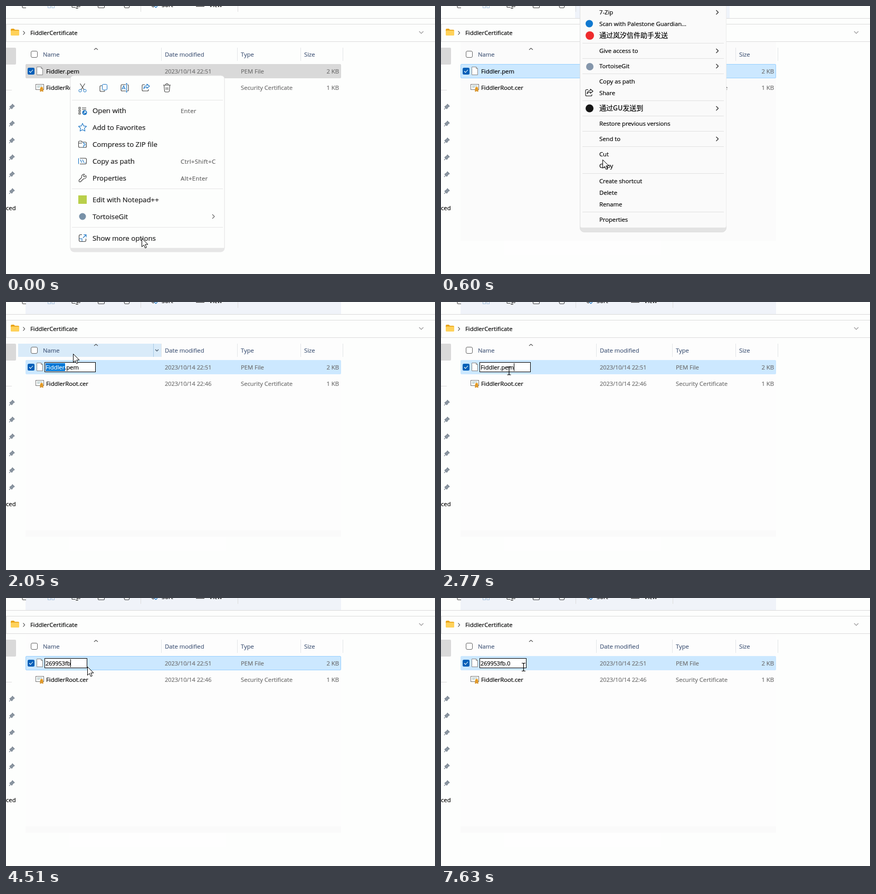
An HTML page that plays this animation: 813 by 508 pixels, repeating every 8 s.

```html
<!DOCTYPE html>
<html lang="en">
<head>
<meta charset="utf-8">
<title>Renaming a file</title>
<style>
html, body { margin: 0; width: 100%; height: 100%; overflow: hidden; background: #fdfefd; }
svg { display: block; }
text { font-family: "Open Sans", "Noto Sans", sans-serif; white-space: pre; }
.cjk { font-family: "Noto Sans CJK SC", "Noto Sans CJK", sans-serif; }
.key { letter-spacing: .35px; }
</style>
</head>
<body>
<svg id="stage" width="813" height="508" viewBox="0 0 813 508"></svg>
<script>
const SMALL = 11.25, BIG = 13.25, BLUE = '#1a74c4', INK = '#444';

// a hairline stroke gives the text the weight of hinted screen type
const text = (x, y, s, fill = '#000', size = SMALL, attrs = '') =>
  `<text x="${x}" y="${y}" fill="${fill}" stroke="${fill}" stroke-width=".2" font-size="${size}" ${attrs}>${s}</text>`;
const rect = (x, y, w, h, fill, attrs = '') =>
  `<rect x="${x}" y="${y}" width="${w}" height="${h}" fill="${fill}" ${attrs}/>`;
const path = (d, stroke = INK, fill = 'none', w = 1.1) =>
  `<path d="${d}" stroke="${stroke}" fill="${fill}" stroke-width="${w}" stroke-linejoin="round"/>`;
const dot = (x, y, r, fill) => `<circle cx="${x}" cy="${y}" r="${r}" fill="${fill}"/>`;
const group = (id, body, attrs = '') => `<g id="${id}" ${attrs}>${body}</g>`;
const at = (x, y, body) => `<g transform="translate(${x} ${y})">${body}</g>`;
const chevron = (x, y, c = INK) => path(`M${x} ${y - 4}l4 4-4 4`, c);
const shareIcon = path('M-2-6H-5q-2 0-2 2V4q0 2 2 2H3q2 0 2-2V3') +
  path('M2-7l5 4-5 4v-2.500q-4 0-6 3.500 .5-6 6-6.500z', BLUE);

function toolbar() {
  return path('M31 0v2q0 1.500 1.500 1.500H38') +
    path('M79.500 0v3.500h5V0M87 0v3.500h4.500V0', '#a9c3dd') +
    path('M125 0v1.500q0 1 1 1h6M136 0v1.500h4V0M132 4.500h5M134.500 0v4') +
    path('M174.500 0v2q0 1.500 1.500 1.500h9q1.500 0 1.500-1.500V0') +
    path('M224 0l.5 2q.3 1.500 1.500 1.500h6q1.200 0 1.500-1.500l.5-2') +
    rect(255, 0, 1, 11, '#ddd') + rect(439, 0, 1, 11, '#ddd') +
    path('M276 0l3 2 2-2', INK) + path('M281 0l3 3 3-3', BLUE) +
    text(295, 2, 'Sort') + path('M360 .5h16', INK, 'none', 1.500) + text(385, 2, 'View') +
    rect(0, 23, 813, 1, '#dadada');
}

function addressBar() {
  return rect(.5, 34.5, 813, 33, '#fdfefd', 'stroke="#dcdcdc"') +
    path('M9 45q0-2 2-2h4l2 2h6q2 0 2 2v3H9z', 'none', '#e8a317') +
    rect(9, 46.500, 16, 9.500, '#ffd25a', 'rx="1.500"') +
    path('M32.500 47.500l3 3.500-3 3.500', '#333') +
    text(46, 55, 'FiddlerCertificate') +
    path('M783 48l4 4 4-4', '#999');
}

function sidebar() {
  let s = rect(-5, 79, 24, 32, '#d9d9d9', 'rx="2"') + rect(0, 159, 11, 1, '#ddd') + text(0, 387, 'ced');
  for (let y = 191; y < 360; y += 32)
    s += at(11, y, path('M1-5l4 4-2 1-3 4-4-4 4-3zM-2 2l-3 3', '#7d8894', '#8b96a2'));
  return s;
}

function header() {
  const c = '#46597a';
  return group('headHover', rect(23, 79, 272, 25, '#d9ebf9') + rect(279, 79, 1, 25, '#a9cbe6') +
      path('M283 90l3 3 3-3', '#456')) +
    rect(47.500, 85.500, 12, 12, '#fff', 'rx="2.500" stroke="#666"') +
    path('M167 83l3.500-3 3.500 3', '#555') +
    text(70, 96, 'Name', c) + text(301, 96, 'Date modified', c) +
    text(445, 96, 'Type', c) + text(565, 96, 'Size', c) +
    [294, 438, 558, 638].map(x => rect(x, 79, 1, 25, '#e3e5e8')).join('');
}

function details(y, date, type, size) {
  const c = '#6d6d6d';
  return text(301, y, date, c, 10.9) + text(445, y, type, c) + text(631, y, size, c, SMALL, 'text-anchor="end"');
}

function fileList() {
  return '<rect id="row" x="37.5" y="110.5" width="597" height="26" rx="1.5"/>' +
    rect(41, 117, 13, 13, '#005fb8', 'rx="2.500"') + path('M44 123.500l2.500 2.500 4.500-5', '#fff') +
    path('M58.500 115.500h8l3 3v12h-11z', '#888', '#fff', 1) + path('M66.500 115.500v3h3', '#888', 'none', 1) +
    text(76, 128, 'Fiddler.pem', '#000', SMALL, 'id="name"') +
    details(128, '2023/10/14 22:51', 'PEM File', '2 KB') +
    rect(56.500, 148.500, 15, 10, '#fff', 'stroke="#777"') +
    path('M59 151.500h10M59 154h5', '#8aa') +
    path('M65 157v5l2.500-1.500 2.500 1.500v-5', '#d18a1b', '#e7a13a') + dot(67.500, 156, 2.700, '#e59a22') +
    text(76, 159, 'FiddlerRoot.cer') +
    details(159, '2023/10/14 22:46', 'Security Certificate', '1 KB');
}

function editBox() {
  return group('edit',
    '<rect id="box" x="73.5" y="114.5" height="18" fill="#fff" stroke="#000"/>' +
    '<rect id="mark" x="75" y="116" height="15" fill="#0078d7"/>' +
    '<text id="typed" x="75" y="128" stroke-width=".2"><tspan id="marked" fill="#fff" stroke="#fff"></tspan>' +
    '<tspan id="plain" stroke="#000"></tspan></text>' +
    '<rect id="caret" y="116" width="1" height="15"/>');
}

function shortMenu() {
  const items = [
    [198, 'Open with', 'Enter'], [230, 'Add to Favorites'], [262, 'Compress to ZIP file'],
    [294, 'Copy as path', 'Ctrl+Shift+C'], [326, 'Properties', 'Alt+Enter'],
    [367, 'Edit with Notepad++'], [399, 'TortoiseGit'], [440, 'Show more options']];
  return group('shortMenu',
    rect(121.500, 131.500, 293, 335, '#e6e6e6', 'rx="8"') +
    path('M122 459V139q0-7 7-7H407q7 0 7 7V459z', '#e4e4e4', '#fdfefd', .8) +
    group('moreHover', rect(126, 425, 284, 31, '#f1f1f1', 'rx="4"')) +
    [178, 346, 419].map(y => rect(125, y, 286, 1, '#e6e6e6')).join('') +
    at(145, 155, path('M-4.500-8L3 4M4.500-8L-3 4') +
      '<g fill="none" stroke="#1a74c4"><circle cx="-4.500" cy="5.500" r="2.500"/><circle cx="4.500" cy="5.500" r="2.500"/></g>') +
    at(185, 155, path('M-3-4h-2q-2 0-2 2v7q0 2 2 2h5q2 0 2-2') + rect(-2.500, -6.500, 9, 10.500, '#fff', 'rx="2" stroke="#1a74c4"')) +
    at(225, 155, path('M2-6h-7q-2 0-2 2V4q0 2 2 2h7M5-6q2 0 2 2V4q0 2-2 2') +
      path('M-5 3l3-7 3 7M-4 1h4M3.500-8v16M2-8h3M2 8h3', BLUE)) +
    at(265, 155, shareIcon) +
    at(305, 155, path('M-7-5H7M-2.500-5q0-3 2.500-3t2.500 3M-5.500-5l1 11q.2 2 2 2h5q1.800 0 2-2l1-11M-1.500-1v5M1.500-1v5')) +
    at(145, 198, path('M-7-6h3v3h-3zM-7-1h3v3h-3zM-7 4h3v3h-3zM-1-5h8M-1-2h8') + dot(4, 4, 4.500, BLUE) + path('M2 6l4-4M3 2h3v3', '#fff')) +
    at(145, 230, path('M0-7.500l2.300 4.900 5.300 .6-4 3.600 1.100 5.400L0 4.400-4.700 7l1.100-5.400-4-3.600 5.300-.6z', BLUE)) +
    at(145, 262, path('M-7.500-4q0-2 2-2h3l2 2h6q2 0 2 2v6q0 2-2 2h-11q-2 0-2-2zM-7-2h6') + path('M2-4v3h3v3H2v4', BLUE)) +
    at(145, 294, path('M-5-5.500H5q2.500 0 2.500 2.500V3q0 2.500-2.500 2.500H-5') + path('M-7.500-5.500v11M-4-3l2.500 6M0-3l2.500 6M4 3h2', BLUE)) +
    at(145, 326, path('M6.500-4.500L3-2 1.500-4 4-7Q0-8-1.500-4-2-2-1.500-1l-5 5q-1 2 .5 3t3-.5l5-5q3 .5 5-2.500 .5-2-.5-3.500z')) +
    rect(137, 359, 16, 16, '#b9cf4a') + dot(145, 399, 6.500, '#7891a8') +
    at(145, 440, path('M-1-6.500h-3q-2.500 0-2.500 2.500v8q0 2.500 2.500 2.500h8q2.500 0 2.500-2.500v-3') + path('M2-6.500h5v5M7-6.500L1-.5M-6 1h5v5', BLUE)) +
    items.map(([y, s, key]) => text(164, y + 5, s, '#1b1b1b', BIG) +
      (key ? text(331, y + 5, key, '#606060', SMALL, 'class="key"') : '')).join('') +
    chevron(391, 399, '#666'));
}

function longMenu() {
  const items = [
    [12, '7-Zip', 1], [34, 'Scan with Palestone Guardian...'], [85, 'Give access to', 1], [114, 'TortoiseGit', 1],
    [143, 'Copy as path'], [165, 'Share'], [223, 'Restore previous versions'], [252, 'Send to', 1],
    [281, 'Cut'], [303, 'Copy'], [332, 'Create shortcut'], [354, 'Delete'], [376, 'Rename'], [405, 'Properties']];
  return group('longMenu',
    rect(263.500, -20, 277, 448.500, '#e3e3e3', 'rx="8" stroke="#dedede"') +
    rect(264, -20, 276.500, 440, '#fafafa', 'rx="3"') +
    group('renameHover', rect(268, 365, 268, 22, '#f0f0f0', 'rx="3"')) +
    [70, 99, 128, 179, 208, 237, 266, 317, 390].map(y => rect(268, y, 268, 1, '#e2e2e2')).join('') +
    items.map(([y, s, sub]) => text(300, y + 4, s) + (sub ? chevron(521.5, y, '#222') : '')).join('') +
    text(300, 60, '通过岚汐信件助手发送', '#000', 13, 'class="cjk"') +
    text(300, 198, '通过GU发送到', '#000', 13, 'class="cjk"') + chevron(521.5, 194, '#222') +
    dot(281, 33.500, 7, '#0f78d0') + dot(282, 56, 8, '#ee2a2c') +
    dot(282, 115, 7, '#8496ab') + dot(281.500, 194, 7.500, '#151515') +
    at(281, 164.500, shareIcon.replaceAll(BLUE, '#111').replaceAll(INK, '#111')));
}

const stage = document.getElementById('stage');
stage.innerHTML = rect(0, 0, 813, 508, '#fdfefd') +
  group('backOpen', rect(37, 68, 598, 377, '#fbfbfb') + rect(254, 0, 293, 23, '#eff3fa')) +
  group('backClosed', rect(37, 68, 598, 365, '#fdfdfd') + rect(37, 433, 598, 12, '#fafafa') +
    rect(37, 0, 598, 23, '#f0f3f9')) +
  group('glow', rect(120, 445, 296, 27, '#fefefe')) +
  toolbar() + addressBar() + sidebar() + header() + fileList() + editBox() + shortMenu() + longMenu() +
  group('pointer',
    group('arrow', path('M.5 .5V16.500L4.200 13l2.500 5.700 2.600-1.100-2.500-5.600H12z', '#000', '#fff', 1)) +
    group('beam', path('M-3.500-7.500h2.500l1 1 1-1H3.500M0-6.500V6.500M-3.500 7.500h2.500l1-1 1 1H3.500', '#000', 'none', 1.200)));

const el = {};
stage.querySelectorAll('[id]').forEach(e => el[e.id] = e);
const show = (id, on) => el[id].setAttribute('display', on ? 'inline' : 'none');
const set = (id, attrs) => { for (const k in attrs) el[id].setAttribute(k, attrs[k]); };
const latest = (list, t) => list.findLast(k => k[0] <= t);
const within = (t, ...spans) => spans.some(([a, b]) => t >= a && t < b);

// time, x, y
const moves = [
  [0, 257, 440], [240, 262, 425], [360, 276, 384], [480, 296, 330], [600, 306, 291], [720, 304, 276],
  [840, 301, 264], [960, 312, 276], [1080, 330, 301], [1200, 350, 329], [1320, 359, 350], [1440, 347, 368],
  [1560, 334, 378], [1810, 310, 330], [1930, 205, 180], [2050, 127, 98], [2290, 128, 103], [2410, 128, 107],
  [2530, 128, 111], [2650, 129, 130.5], [2890, 136, 130.5], [3010, 148, 130.5], [3260, 154, 127],
  [3510, 154, 130], [5760, 156.5, 131]];
// time, selected text, plain text, selection width, caret x, font size
const edits = [
  [1930, 'Fiddler', '.pem', 37, 112, SMALL], [2650, '', 'Fiddler.pem', 0, 138, SMALL],
  [2890, 'Fiddler.pem', '', 63, 138, SMALL], [3010, '', '269953fb', 0, 122, 10.8],
  [5760, '', '269953fb.', 0, 125, 10.8], [7000, '', '269953fb.0', 0, 131, 10.8]];
// time, right edge of the edit box
const edges = [[0, 170], [3010, 154], [5760, 157], [7130, 162]];

function draw(t) {
  const menu = within(t, [360, 1810]), editing = t >= 1930;
  show('shortMenu', t < 240);
  show('moreHover', within(t, [120, 240]));
  show('longMenu', menu);
  show('renameHover', within(t, [1440, 1810]));
  show('backOpen', menu);
  show('backClosed', t >= 1810);
  show('glow', t >= 240);
  show('headHover', within(t, [2050, 2530]));

  const fill = t < 240 ? '#d9d9d9' : '#cce8ff';
  const hover = within(t, [240, 1810], [2530, 2650], [3510, 5760]);
  set('row', { fill, stroke: hover ? '#99d1ff' : fill });

  show('name', !editing);
  show('edit', editing);
  if (editing) {
    const [, marked, plain, width, caret, size] = latest(edits, t);
    el.marked.textContent = marked;
    el.plain.textContent = plain;
    set('typed', { 'font-size': size });
    set('mark', { width });
    set('box', { width: latest(edges, t)[1] - 74 });
    set('caret', { x: caret });
    show('caret', within(t, [2650, 2890], [3010, 4010], [4510, 5130], [5630, 6380], [6880, 7630]));
  }

  const [, x, y] = latest(moves, t), beam = within(t, [2650, 3260], [5760, 8000]);
  set('pointer', { transform: `translate(${x} ${y})` });
  show('arrow', !beam);
  show('beam', beam);
}

const start = performance.now();
function tick() {
  draw((performance.now() - start) % 8000);
  requestAnimationFrame(tick);
}
tick();
</script>
</body>
</html>
```
